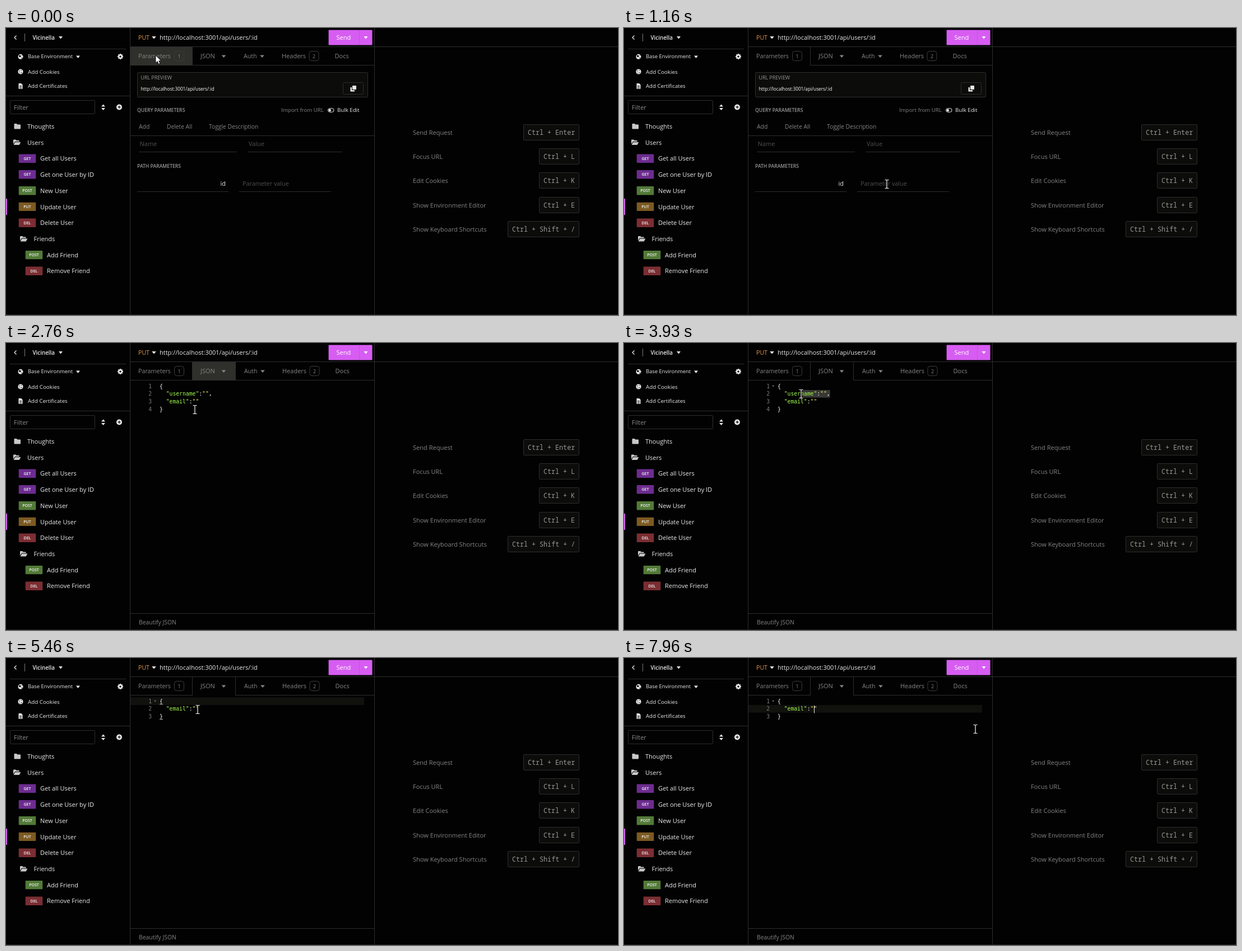
Recreate the animation shown at these times as an HTML page. Size 1092 px wide and 513 px high, loop 8 s.

```html
<!DOCTYPE html>
<html lang="en">
<head>
<meta charset="utf-8">
<title>API client</title>
<style>
  html, body { margin: 0; width: 100%; height: 100%; overflow: hidden; background: #020202; }
  svg { display: block; width: 1092px; height: 513px; font-family: "Open Sans", "Noto Sans", sans-serif; }
  text { white-space: pre; }
  .keys { font-family: "Noto Sans Mono", "DejaVu Sans Mono", monospace; }
  .code { font-family: "DejaVu Sans Mono", "Noto Sans Mono", monospace; }
</style>
</head>
<body>
<svg id="stage" viewBox="0 0 1092 513"></svg>
<script>
const LINE = '#2d2d2d', WHITE = '#eaeaea', GREY = '#858585', LABEL = '#989898', DIM = '#505050', PANEL = '#0c0c0a';
const CHAR = 5.86, CODE_X = 274, ROW = 13.6, ROW_TOP = 70.4;
const USER_ID = '660abbdffe7ad802e35e16a1';

// Text is placed by its left edge (or anchor) and the middle of its capitals.
const text = (x, y, str, size = 11, fill = WHITE, attrs = '') =>
  `<text x="${x}" y="${(y + size * 0.36).toFixed(2)}" font-size="${size}" fill="${fill}" ${attrs}>${str}</text>`;
const rect = (x, y, w, h, fill, attrs = '') =>
  `<rect x="${x}" y="${y}" width="${w}" height="${h}" fill="${fill}" ${attrs}/>`;
const frame = (x, y, w, h, fill = 'none', rx = 1, stroke = LINE) =>
  rect(x + 0.5, y + 0.5, w - 1, h - 1, fill, `stroke="${stroke}" rx="${rx}"`);
const hline = (x1, x2, y, fill = LINE) => rect(x1, y, x2 - x1, 1, fill);
const vline = (x, y1, y2, fill = LINE) => rect(x, y1, 1, y2 - y1, fill);
const path = (d, fill = WHITE, attrs = '') => `<path d="${d}" fill="${fill}" ${attrs}/>`;
const caretDown = (x, y, fill = WHITE, r = 3.8) => path(`M${x - r} ${y - 2}h${2 * r}l${-r} 4.4z`, fill);
const group = (id, body, attrs = '') => `<g id="${id}" ${attrs}>${body}</g>`;
const BOLD = 'font-weight="600"', KEYS = 'class="keys"', CODE = 'class="code"';
const END = 'text-anchor="end"', MID = 'text-anchor="middle"';

const folder = (x, y) => path(`M${x} ${y - 4}q0-1 1-1h3.4l1.5 1.6h4.6q1 0 1 1v6q0 1-1 1H${x + 1}q-1 0-1-1z`, '#c9c9c9');
const openFolder = (x, y) =>
  path(`M${x} ${y + 3}v-7q0-1 1-1h3.2l1.5 1.6h4q1 0 1 1v1h-7.6zM${x + 0.6} ${y + 4.6}l2.8-5.2h10l-2.8 5.2z`, '#c9c9c9');

function request(x, y, method, name) {
  const colours = { GET: '#6d2c90', POST: '#527a38', PUT: '#7c5a22', DEL: '#7b2e33' };
  return rect(x - 0.3, y - 8, 30.6, 15.4, colours[method], 'rx="1"') +
    text(x + 15, y - 0.5, method, 7, '#f4f4f4', `${BOLD} ${MID}`) + text(x + 38, y, name);
}

function sidebar() {
  const teeth = [0, 45, 90, 135].map(a => rect(202.9, 46, 2.2, 10, WHITE, `transform="rotate(${a} 204 51)"`)).join('');
  return path('M18.5 13.5L15 17l3.5 3.5', 'none', `stroke="${WHITE}" stroke-width="1.3"`) +
    vline(33, 10, 24, '#777') + text(47.5, 17, 'Vicinella', 9.8, WHITE, BOLD) + caretDown(97.5, 17, WHITE, 3.5) +
    hline(7, 214, 37) +
    `<circle cx="26" cy="51.3" r="4.5" fill="${WHITE}"/>` +
    path('M23 48.5l3 .2 1 2-2 1.5-2-1zM27.5 52.5l2 .4-1.6 2.4zM28 47.8l1.4 1.2-1 1z', '#111') +
    text(39, 51, 'Base Environment', 9.45) + caretDown(128.5, 51.5, WHITE, 3.5) +
    teeth + `<circle cx="204" cy="51" r="3.7" fill="${WHITE}"/><circle cx="204" cy="51" r="1.6" fill="#020202"/>` +
    `<circle cx="26" cy="78" r="4.6" fill="${WHITE}"/>` +
    path('M23.5 76h1.4v1.4h-1.4zM26.8 75.2h1.3v1.3h-1.3zM27 79h1.4v1.4h-1.4zM24 79.7h1.2v1.2h-1.2z', '#111') +
    text(39, 78, 'Add Cookies', 9.8) +
    path('M22.5 99h4.6l2.4 2.4v7.4h-7z') + path('M24 103h4v.9h-4zM24 105h4v.9h-4zM24 107h4v.8h-4z', '#222') +
    text(39, 104, 'Add Certificates', 9.65) +
    hline(0, 221, 121) + frame(7, 129, 152, 25) + text(14, 142, 'Filter', 11, '#8d8d8d') +
    path('M170 140.6l3.5-4 3.5 4zM170 143l3.5 4 3.5-4z') +
    `<circle cx="202" cy="141.5" r="5" fill="${WHITE}"/>` + path('M201.4 138.8h1.3v2h2v1.3h-2v2h-1.3v-2h-2v-1.3h2z', '#111') +
    folder(14.5, 176) + text(38, 176, 'Thoughts') + openFolder(13, 204.5) + text(38, 205, 'Users') +
    request(23, 233.5, 'GET', 'Get all Users') + request(23, 262, 'GET', 'Get one User by ID') +
    request(23, 291, 'POST', 'New User') + request(23, 319.7, 'PUT', 'Update User') +
    request(23, 348.5, 'DEL', 'Delete User') + rect(0, 305, 2, 29, '#d65df0') +
    openFolder(25, 377) + text(49.5, 377, 'Friends') +
    request(35, 405.9, 'POST', 'Add Friend') + request(35, 434.5, 'DEL', 'Remove Friend');
}

function addressBar() {
  return text(236, 17, 'PUT', 10.6, '#e8964a') + caretDown(264, 17) +
    text(274, 17, 'http://localhost:3001/api/users/:id', 11.03) +
    rect(575.6, 3.4, 77.9, 27.1, '#d75df2', 'rx="1"') + vline(630, 4, 30, '#c650e0') +
    text(589.5, 17, 'Send', 11.1, '#fff') + caretDown(642, 17, '#fff', 3.5);
}

function tabs() {
  const count = (x, n) => frame(x, 41, 18, 18, 'none', 4, '#3c3c3c') + text(x + 9, 50.5, n, 8.8, GREY, MID);
  return text(236, 50.5, 'Parameters', 10.75, GREY) + count(300, 1) +
    text(347, 50.5, 'JSON', 11, GREY) + caretDown(388.5, 50.5, GREY) +
    group('rightTabs', text(424, 50.5, 'Auth', 10.6, GREY) + caretDown(457, 50.5, GREY) +
      text(492, 50.5, 'Headers', 11, GREY) + count(540.5, 2) + text(586.5, 50.5, 'Docs', 11, GREY));
}

function paramsPanel() {
  const id = `<tspan id="urlEnd"></tspan>`;
  return vline(332, 34, 67) + hline(332, 657, 66) +
    frame(234, 79, 412, 45, PANEL) + text(240.5, 88.5, 'URL PREVIEW', 8.9, LABEL) +
    text(240.5, 109, `http://localhost:3001/api/users/${id}`, 8.25, '#fff') +
    frame(601, 97, 37, 22, PANEL, 2) + rect(618, 103, 7, 7, WHITE, 'rx="1"') +
    path('M614.5 106h2.5v5h5v2.5h-7.5z') +
    text(234, 147.3, 'QUERY PARAMETERS', 8.65, LABEL, BOLD) + text(491, 147, 'Import from URL', 9.7, GREY) +
    `<rect x="574.5" y="143.7" width="10.6" height="6.6" rx="3.3" fill="none" stroke="${WHITE}"/>` +
    `<circle cx="577.8" cy="147" r="2.2" fill="${WHITE}"/>` + text(591, 147, 'Bulk Edit', 9.7) +
    text(237, 176, 'Add', 10.4, GREY) + text(287, 176, 'Delete All', 10.25, GREY) +
    text(362, 176, 'Toggle Description', 10.27, GREY) + hline(222, 657, 192) +
    text(238.5, 207, 'Name', 11, DIM) + hline(237, 412, 221) +
    text(433, 207, 'Value', 11, DIM) + hline(431, 600, 221) +
    text(234, 247, 'PATH PARAMETERS', 8.65, LABEL, BOLD) +
    text(392, 278.5, 'id', 11, WHITE, END) + hline(234, 397, 292) + hline(416, 580, 292) +
    group('placeholder', text(422, 278.5, 'Parameter value', 10.8, DIM)) +
    group('idValue', text(550.3, 278.5, USER_ID, 11, WHITE, END), 'clip-path="url(#field)"');
}

function code(id, keys) {
  const row = i => ROW_TOP + ROW * (i + 0.5);
  const put = (i, col, str, fill) => text(CODE_X + col * CHAR, row(i), str, 9.73, fill, CODE);
  let body = put(0, 0, '{', '#fff') + put(keys.length + 1, 0, '}', '#fff');
  keys.forEach((key, k) => {
    const comma = k < keys.length - 1 ? ',' : '';
    body += put(k + 1, 2, `<tspan fill="#a4fb4c">"${key}"</tspan>:<tspan fill="#efe56c">""</tspan>${comma}`, '#fff');
  });
  for (let i = 0; i < keys.length + 2; i++) body += text(260, row(i), i + 1, 9.73, '#7c7c7c', `${CODE} ${END}`);
  return group(id, body);
}

function jsonPanel() {
  return vline(332, 34, 67) + vline(409, 34, 67) + hline(222, 333, 66) + hline(409, 657, 66) +
    group('activeLine', rect(222, ROW_TOP, 417, ROW, '#11110e')) +
    rect(0, ROW_TOP, 0, ROW, '#383835', 'id="selTop"') + rect(0, ROW_TOP + ROW, 0, ROW, '#383835', 'id="selRow"') +
    code('fullCode', ['username', 'email']) + code('shortCode', ['email']) +
    group('brackets', hline(274, 280, 82, '#b4b4b4') + hline(274, 280, 109, '#b4b4b4')) +
    group('fold', path('M264 75.8h4.4l-2.2 2.8z', '#666')) +
    rect(0, 0, 1, 13.5, '#f0f0f0', 'id="textCaret"') +
    hline(222, 657, 483) + text(237, 499, 'Beautify JSON', 10.4, GREY);
}

function shortcuts() {
  return [['Send Request', 'Ctrl + Enter', 923], ['Focus URL', 'Ctrl + L', 951], ['Edit Cookies', 'Ctrl + K', 951],
    ['Show Environment Editor', 'Ctrl + E', 951], ['Show Keyboard Shortcuts', 'Ctrl + Shift + /', 895]]
    .map(([label, keys, x], i) => {
      const y = 172 + 43.2 * i;
      return text(726, y + 15, label, 11.05, GREY) +
        frame(x, Math.round(y), 1023 - x, 29, PANEL) + text(x + 8, y + 14.7, keys, 11.7, LABEL, KEYS);
    }).join('');
}

const arrow = path('M0 0V13.5L3.2 10.6 5.4 15.4 7.8 14.3 5.7 9.7H10Z', '#fff', 'stroke="#000" stroke-width=".8"');
const beamShape = 'M-3.5-7.5h2.2q1.3 0 1.3 1.2 0-1.2 1.3-1.2h2.2M0-6.5v13M-3.5 7.5h2.2q1.3 0 1.3-1.2 0 1.2 1.3 1.2h2.2';
const beam = path(beamShape, 'none', 'stroke="#000" stroke-width="2.6"') +
  path(beamShape, 'none', 'stroke="#fff" stroke-width="1.2"');

document.getElementById('stage').innerHTML =
  '<clipPath id="field"><rect x="422" y="266" width="150" height="26"/></clipPath>' +
  rect(0, 0, 1092, 513, '#020202') + group('params', paramsPanel()) + group('json', jsonPanel()) +
  rect(0, 34, 0, 33, '#2f2f2c', 'id="tabGlow"') +
  sidebar() + addressBar() + hline(222, 1092, 33) + tabs() + shortcuts() +
  vline(221, 0, 513) + vline(657, 0, 513) + hline(0, 1092, 512, '#222') +
  group('pointer', group('arrow', arrow) + group('beam', beam));

const el = {};
document.querySelectorAll('[id]').forEach(node => el[node.id] = node);
const show = (id, on) => el[id].style.display = on ? '' : 'none';
const set = (id, attrs) => Object.entries(attrs).forEach(([k, v]) => el[id].setAttribute(k, v));

// Pointer moves: start, end, then Bezier points.
const moves = [
  [60, 660, [267, 49], [480, -40], [720, 120], [469, 279]],
  [1600, 2180, [469, 279], [450, 150], [368, 59]],
  [2630, 2760, [368, 59], [337, 119]],
  [2930, 3530, [337, 119], [420, 125], [371, 92]],
  [3700, 3930, [371, 92], [316, 91]],
  [3930, 4160, [316, 91], [277, 79]],
  [4460, 5260, [277, 79], [350, 130], [330, 57]],
  [5270, 5460, [330, 57], [342, 92]],
  [5930, 6260, [342, 92], [627, 127]]
];
const bezier = (pts, u) => pts.length === 1 ? pts[0] :
  bezier(pts.slice(1).map((p, i) => p.map((v, k) => pts[i][k] + (v - pts[i][k]) * u)), u);

function pointerAt(t) {
  const [start, end, ...pts] = moves.filter(m => m[0] <= t).pop() || moves[0];
  const u = Math.min(1, Math.max(0, (t - start) / (end - start)));
  return bezier(pts, u * u * (3 - 2 * u));
}

function draw(t) {
  const between = (a, b) => t >= a && t < b;
  const [x, y] = pointerAt(t);
  const onJson = t >= 2300, deleted = t >= 4460, clickedEmail = t >= 5730;

  const overText = onJson ? y > 66 : (y < 33 && x > 270 && x < 576) || (y > 266 && y < 293 && x > 416 && x < 580);
  show('pointer', !between(1430, 1600));
  set('pointer', { transform: `translate(${x.toFixed(1)} ${y.toFixed(1)})` });
  show('beam', overText);
  show('arrow', !overText);

  show('params', !onJson);
  show('json', onJson);
  set('rightTabs', { transform: `translate(${onJson ? 1 : 0} 0)` });
  const glow = t < 100 ? [222, 110] : between(2300, 2930) ? [332, 78] : [0, 0];
  set('tabGlow', { x: glow[0], width: glow[1] });

  show('placeholder', t < 1430);
  show('idValue', t >= 1430);
  el.urlEnd.textContent = t < 1600 ? ':id' : USER_ID;

  show('fullCode', !deleted);
  show('shortCode', deleted);
  show('fold', t >= 2930);
  show('brackets', deleted && !clickedEmail);
  show('activeLine', deleted);
  set('activeLine', { transform: `translate(0 ${clickedEmail ? ROW : 0})` });

  const selecting = between(3700, 4460), upper = selecting && y < ROW_TOP + ROW;
  const col = upper ? 0 : Math.min(16, Math.round((x - CODE_X) / CHAR));
  const left = CODE_X + col * CHAR;
  set('selRow', { x: left, width: selecting ? CODE_X + 16 * CHAR - left : 0 });
  set('selTop', { x: CODE_X + CHAR, width: upper ? 639 - CODE_X - CHAR : 0 });

  const blinkOn = Math.floor((t - 5730) / 532) % 2 === 0;
  show('textCaret', clickedEmail ? blinkOn : between(4460, 5300));
  set('textCaret', clickedEmail ? { x: 339, y: 85 } : { x: 280, y: 71 });
}

let origin;
function tick(now) {
  origin ??= now;
  draw((now - origin) % 8000);
  requestAnimationFrame(tick);
}
draw(0);
requestAnimationFrame(tick);
</script>
</body>
</html>
```
